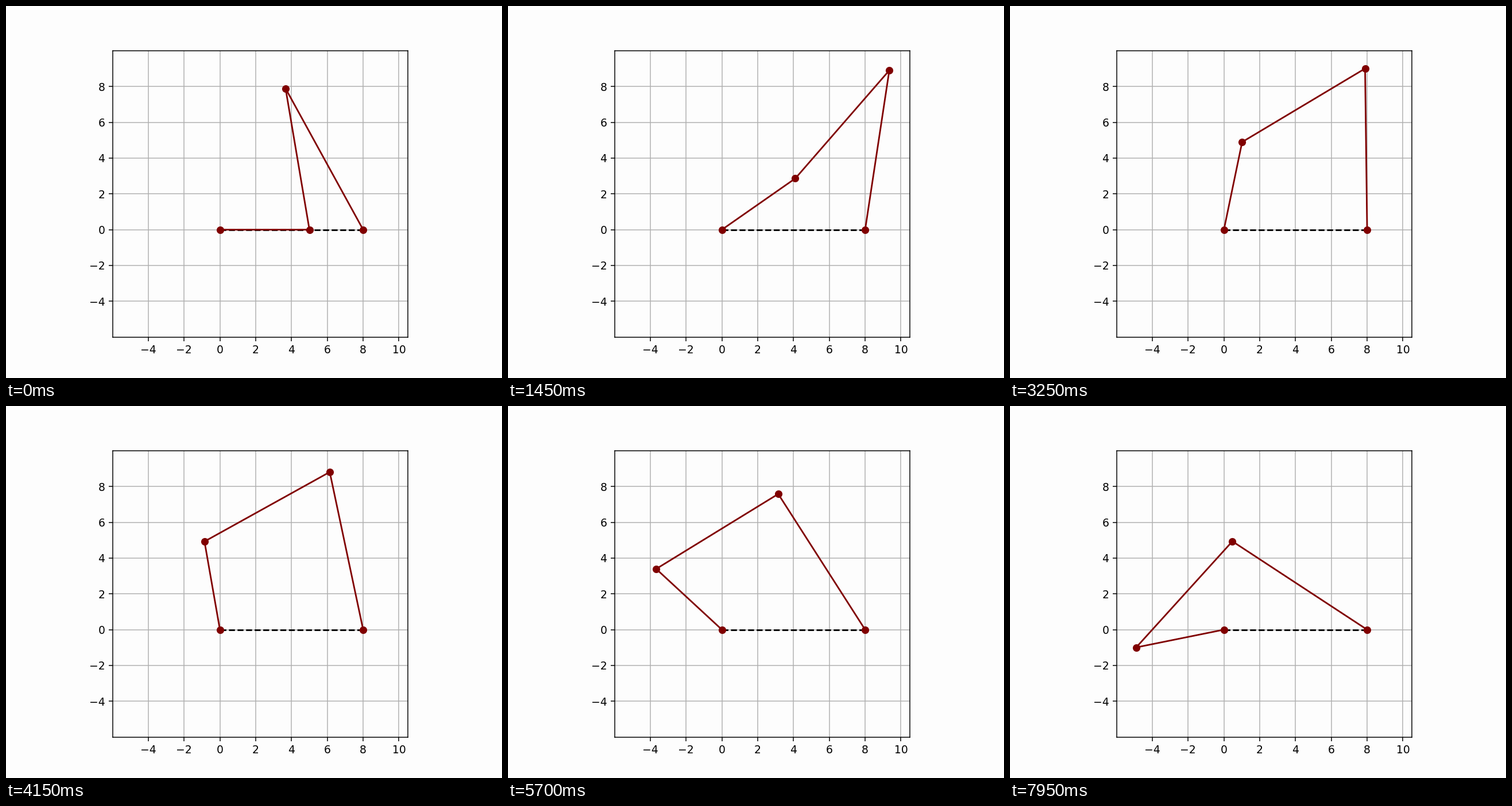
Recreate the animation shown at these times as a matplotlib script. Size 864 px wide and 648 px high, loop 8 s.

```python
import numpy as np
import matplotlib.pyplot as plt
from matplotlib.animation import FuncAnimation

# Four-bar linkage: crank, coupler, rocker, ground
CRANK, COUPLER, ROCKER, GROUND = 5, 8, 9, 8
FRAMES, INTERVAL = 160, 50
STEPS_PER_TURN = 299
BACKGROUND = "#fdfdfd"

PIVOT_A = np.array([0.0, 0.0])
PIVOT_B = np.array([GROUND, 0.0])


def joints(frame):
    """Positions of the four joints, from the crank pivot to the rocker pivot."""
    angle = 2 * np.pi * frame / STEPS_PER_TURN
    pin = CRANK * np.array([np.cos(angle), np.sin(angle)])
    diagonal = PIVOT_B - pin
    dist = np.hypot(*diagonal)
    along = (dist**2 + COUPLER**2 - ROCKER**2) / (2 * dist)
    height = np.sqrt(COUPLER**2 - along**2)
    unit = diagonal / dist
    normal = np.array([-unit[1], unit[0]])
    return np.array([PIVOT_A, pin, pin + along * unit + height * normal, PIVOT_B])


fig, ax = plt.subplots(figsize=(6.4, 4.8), dpi=135, facecolor=BACKGROUND)
ax.set_facecolor(BACKGROUND)
ax.set_aspect("equal")
ax.set_xlim(-6, 10.5)
ax.set_ylim(-6, 10)
ax.set_xticks(range(-4, 11, 2))
ax.set_yticks(range(-4, 9, 2))
ax.grid(True)

ax.plot([0, GROUND], [0, 0], "k--", lw=1.5)
(bars,) = ax.plot([], [], "o-", color="maroon", lw=1.5, ms=6)


def update(frame):
    bars.set_data(*joints(frame).T)
    return (bars,)


anim = FuncAnimation(fig, update, frames=FRAMES, interval=INTERVAL,
                     repeat=True, repeat_delay=0)
plt.show()
```
